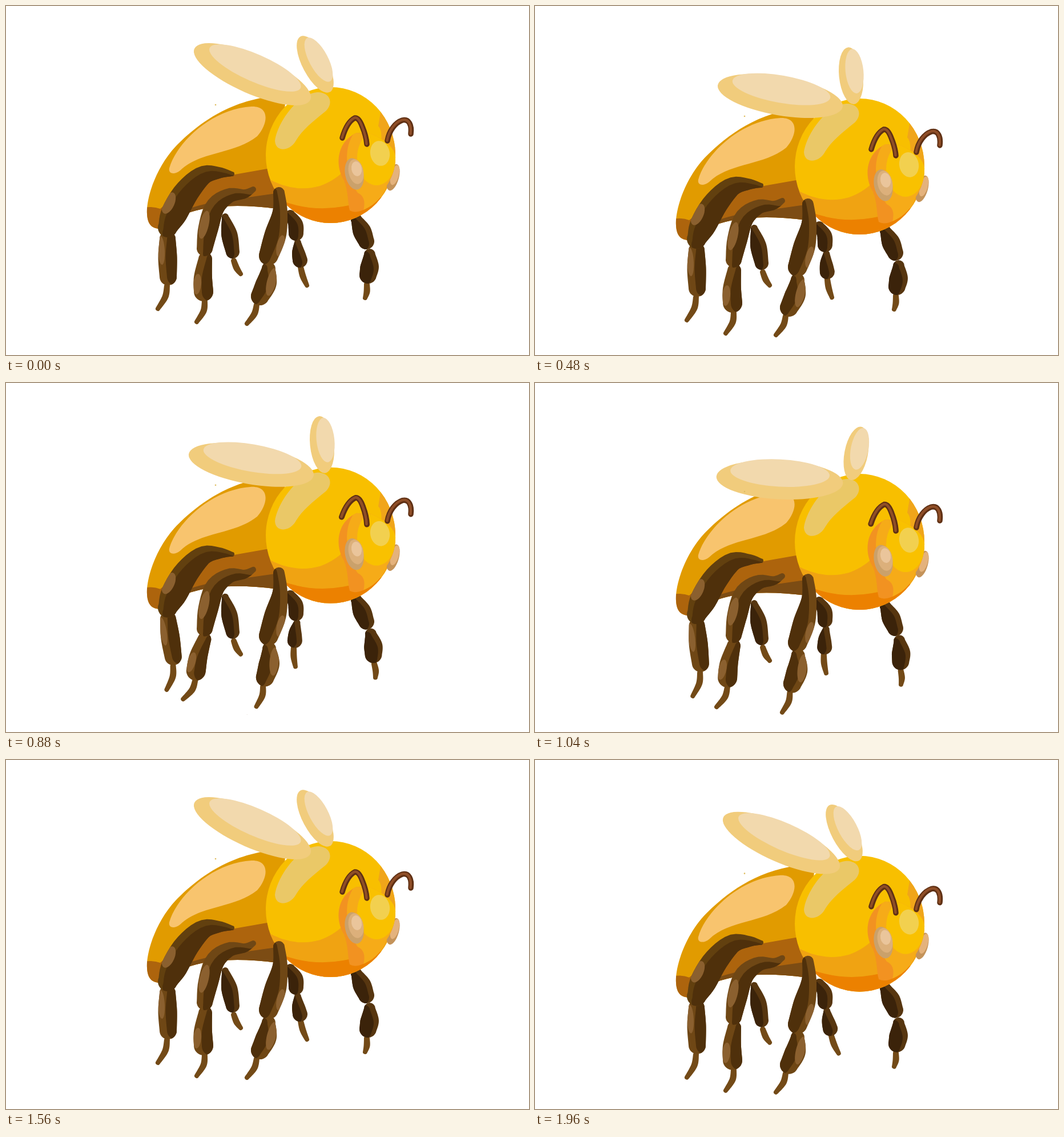
Animation, 916 px wide and 611 px high, one loop 2000 ms. Source, as an HTML page:

```html
<!DOCTYPE html>
<html lang="en">
<head>
<meta charset="utf-8">
<title>Bee</title>
<style>
html, body { margin: 0; width: 100%; height: 100%; overflow: hidden; background: #fff; }
svg { display: block; width: 100vw; height: 100vh; }
</style>
</head>
<body>
<svg id="stage" viewBox="0 0 916 611"></svg>
<script>
const DARK = '#4f300b', MID = '#6f4715', SOFT = '#8b602f', FOOT = '#734a17';
const FAR = '#3b230a', FAR_MID = '#573610';
const HORN = '#5f3014', GLOW = '#8f4e27';
let clips = 0;

const fill = (d, color) => `<path d="${d}" fill="${color}"/>`;
const oval = (x, y, rx, ry, turn, color) =>
  `<ellipse cx="${x}" cy="${y}" rx="${rx}" ry="${ry}" transform="rotate(${turn} ${x} ${y})" fill="${color}"/>`;
const line = (d, w, color) =>
  `<path d="${d}" fill="none" stroke="${color}" stroke-width="${w}" stroke-linecap="round"/>`;
const group = (id, ...kids) => `<g id="${id}">${kids.join('')}</g>`;

// A shape whose inner shades are cut at its outline.
function shape(d, color, ...inner) {
  const id = 'cut' + clips++;
  return `<clipPath id="${id}"><path d="${d}"/></clipPath>${fill(d, color)}` +
    `<g clip-path="url(#${id})">${inner.join('')}</g>`;
}

// Point on a smooth curve through the knots, each [x, y, radius].
function along(knots, u) {
  const last = knots.length - 1, pos = u * last;
  const n = Math.min(Math.floor(pos), last - 1), t = pos - n;
  const at = j => knots[Math.max(0, Math.min(last, j))];
  const [a, b, c, d] = [at(n - 1), at(n), at(n + 1), at(n + 2)];
  return b.map((v, j) => v + t / 2 * (c[j] - a[j] +
    t * (2 * a[j] - 5 * v + 4 * c[j] - d[j] + t * (3 * (v - c[j]) + d[j] - a[j]))));
}

// Outline of a round-ended tube that follows the knots.
function tube(knots) {
  const steps = 24, left = [], right = [], r = [];
  for (let i = 0; i <= steps; i++) {
    const u = i / steps, [x, y, w] = along(knots, u);
    const a = along(knots, Math.max(0, u - .02)), b = along(knots, Math.min(1, u + .02));
    const dir = Math.atan2(b[1] - a[1], b[0] - a[0]) + Math.PI / 2;
    const dx = w * Math.cos(dir), dy = w * Math.sin(dir);
    left.push([x + dx, y + dy]);
    right.unshift([x - dx, y - dy]);
    r.push(w);
  }
  const arc = w => `A${w} ${w} 0 0 0 `;
  return `M${left.join('L')}${arc(r[steps])}${right.join('L')}${arc(r[0])}${left[0]}Z`;
}

// A leg part: its lit side shows where the shifted dark copy leaves it bare.
function limb(knots, lit, dark, dx, dy, glint = '') {
  const d = tube(knots);
  return shape(d, lit, `<g transform="translate(${dx} ${dy})">${fill(d, dark)}</g>`, glint);
}
const foot = (x0, y0, x1, y1, x2, y2) => fill(tube([[x0, y0, 5], [x1, y1, 5.5], [x2, y2, 4]]), FOOT);
const farLimb = (...knots) => limb(knots, FAR_MID, FAR, -9, 4);

const farLegs = [
  foot(399, 446, 404, 459, 411, 469),
  farLimb([384, 369, 6], [391, 399, 14], [397, 430, 12]),
  group('farMid',
    foot(516, 457, 520, 473, 527, 489),
    farLimb([511, 414, 6], [512, 430, 11], [515, 445, 13])),
  farLimb([498, 366, 9], [507, 382, 13], [508, 398, 13]),
  group('farFront',
    foot(632, 487, 632, 500, 629, 511),
    farLimb([637, 435, 10], [637, 455, 16], [634, 471, 15])),
  farLimb([614, 374, 10], [623, 393, 16], [631, 412, 14])
];

const abdomen = shape(
  'M490 156C400 160 345 200 305 238C265 275 245 335 247 364C248 385 258 390 270 390Q330 336 475 355Z',
  '#e19b00',
  fill('M240 353Q258 350 270 355Q318 314 372 300L480 281V420H240Z', '#ad640d'),
  fill('M300 362Q350 342 410 337L480 327V380H300Z', '#7c4c14'),
  fill('M286 284C298 240 360 180 430 176C462 175 460 205 440 228C400 260 340 254 305 288C295 296 284 294 286 284Z', '#f8c46e'));

const thorax = shape('M455 261A113.5 119 0 0 1 682 261A113.5 119 0 0 1 455 261Z', '#f8bf00',
  fill('M657 180L690 200V275H650Q664 222 652 210Z', '#f0a51a'),
  fill('M450 297Q500 329 550 315Q580 304 598 282L690 310V390H450Z', '#f0a312'),
  fill('M480 340Q535 361 590 351Q625 345 660 334V390H480Z', '#ec8100'),
  fill('M471 236C475 205 510 154 545 151C570 151 573 172 560 184C535 204 518 218 507 237C496 255 472 256 471 236Z', '#eac867'));

const head = [
  oval(678, 300, 10, 24, 16, '#c4935a'),
  oval(681, 296, 7, 18, 16, '#e4b27c'),
  shape('M614 222C575 240 578 285 592 305C600 325 598 345 602 358Q615 366 642 348Q662 332 667 314Q683 290 682 262Q677 240 640 224Z', '#f29221',
    fill('M616 215C586 245 596 300 616 327Q634 335 624 365L690 345V215Z', '#f6ab18'),
    oval(649, 266, 34, 48, 0, '#f9c100')),
  oval(655, 258, 17, 22, -10, '#f2d04f'),
  oval(610, 294, 16, 28, -12, '#caa16b'),
  oval(613, 290, 13, 22, -12, '#dcb07b'),
  oval(614, 285, 9, 13, -10, '#eac59b')
];

const leftHorn = 'M589 231Q597 203 611 196Q618 195 624 211Q631 228 632 242';
const rightHorn = 'M668 236C671 218 682 204 694 200C706 197 711 209 709 224';
const horn = (d, w) => line(d, w, HORN) + `<g transform="translate(-.5 -.5)">${line(d, w * .45, GLOW)}</g>`;
const antennae = [group('feeler', horn(leftHorn, 9.5)), horn(rightHorn, 9.5)];

const wing = id => group(id, '<ellipse fill="#f1cc7c"/><ellipse fill="#f2d9ad"/>');

const nearLegs = [
  group('leg1',
    foot(282, 490, 279, 509, 266, 530),
    limb([[283, 408, 14], [283, 440, 16.5], [284, 474, 15]], MID, DARK, 13, 0,
      oval(272, 428, 6, 25, -3, SOFT))),
  limb([[396, 294, 4], [374, 292, 10], [345, 297, 17], [316, 326, 22], [294, 364, 23], [283, 388, 17]],
    '#62400f', DARK, 8, 10, oval(285, 345, 10, 20, 24, SOFT)),
  group('leg2',
    foot(348, 517, 346, 534, 334, 553),
    limb([[349, 443, 12], [345, 475, 16], [346, 500, 17]], MID, DARK, 14, 1,
      oval(335, 487, 7, 18, 5, SOFT))),
  limb([[433, 321, 5], [418, 329, 8], [391, 332, 13], [366, 352, 17], [354, 390, 17.5], [348, 424, 14]],
    MID, DARK, 11, 9, oval(347, 383, 8, 25, 13, SOFT)),
  group('leg3',
    foot(439, 523, 435, 539, 422, 556),
    limb([[460, 460, 12], [456, 485, 18], [445, 508, 16]], MID, DARK, -14, 0,
      oval(465, 483, 8, 25, 14, SOFT))),
  limb([[478, 327, 10], [480, 360, 13], [472, 400, 19], [460, 437, 17]], MID, DARK, -13, 0,
    oval(481, 420, 7, 19, 12, SOFT))
];

document.getElementById('stage').innerHTML = group('bee',
  ...farLegs, abdomen, thorax, ...head, ...antennae, wing('smallWing'), wing('bigWing'), ...nearLegs,
  oval(367, 173, 1.3, 1.3, 0, '#dfbd60'));

const el = Object.fromEntries([...document.querySelectorAll('g[id]')].map(g => [g.id, g]));
const set = (id, value) => el[id].setAttribute('transform', value);
const turn = (id, angle, x, y) => set(id, `rotate(${angle} ${x} ${y})`);

function pose(oval, x, y, rx, ry, angle) {
  oval.setAttribute('rx', rx);
  oval.setAttribute('ry', ry);
  oval.setAttribute('transform', `translate(${x} ${y}) rotate(${angle})`);
}

// f counts wing beats down from the raised pose.
function flap(f) {
  const [big, bigTop] = el.bigWing.children, [small, smallTop] = el.smallWing.children;
  const y = 119.5 + 5 * f + 2 * f * f, a = 23.7 - 6.9 * f, rad = a * Math.PI / 180;
  pose(big, 431.5 - f, y, 111, 34, a);
  pose(bigTop, 431.5 - f + 12 * Math.sin(rad), y - 12 * Math.cos(rad), 87, 24, a);

  const sx = 541.5 + 4 * f + f * f, sy = 102 - 2.5 * f + 1.3 * f * f;
  const tilt = -28 + 7 * f + 2 * f * f, long = 55 - 2.5 * f, wide = 22 - .5 * f;
  pose(small, sx, sy, wide, long, tilt);
  pose(smallTop, sx + 6, sy - 8, wide * .75, long * .78, tilt);
}

const STEP = 40, LOOP = 2000;

function draw(time) {
  const k = Math.floor((time % LOOP) / STEP) % 20;
  const i = Math.min(k, 19 - k);                             // down, then back up
  const s = Math.max(0, Math.min(i / 4, (7 - i) / 3));       // kick and rest
  const late = Math.max(-.12, Math.min(i, 7.7 - i) / 4);
  set('bee', `translate(0 ${2.85 * i})`);
  flap(Math.min(i, 9 - i));
  turn('leg1', -13.6 * s, 283, 400);
  turn('leg2', 23.5 * s, 348, 435);
  turn('leg3', -18 * s, 460, 453);
  turn('farMid', 28 * late, 510, 408);
  turn('farFront', -24 * s, 632, 425);
  set('feeler', `translate(632 243) rotate(${5 * s}) scale(${1 + .08 * s} 1) translate(-632 -243)`);
}

const start = performance.now();
function tick() {
  draw(performance.now() - start);
  requestAnimationFrame(tick);
}
tick();
</script>
</body>
</html>
```
